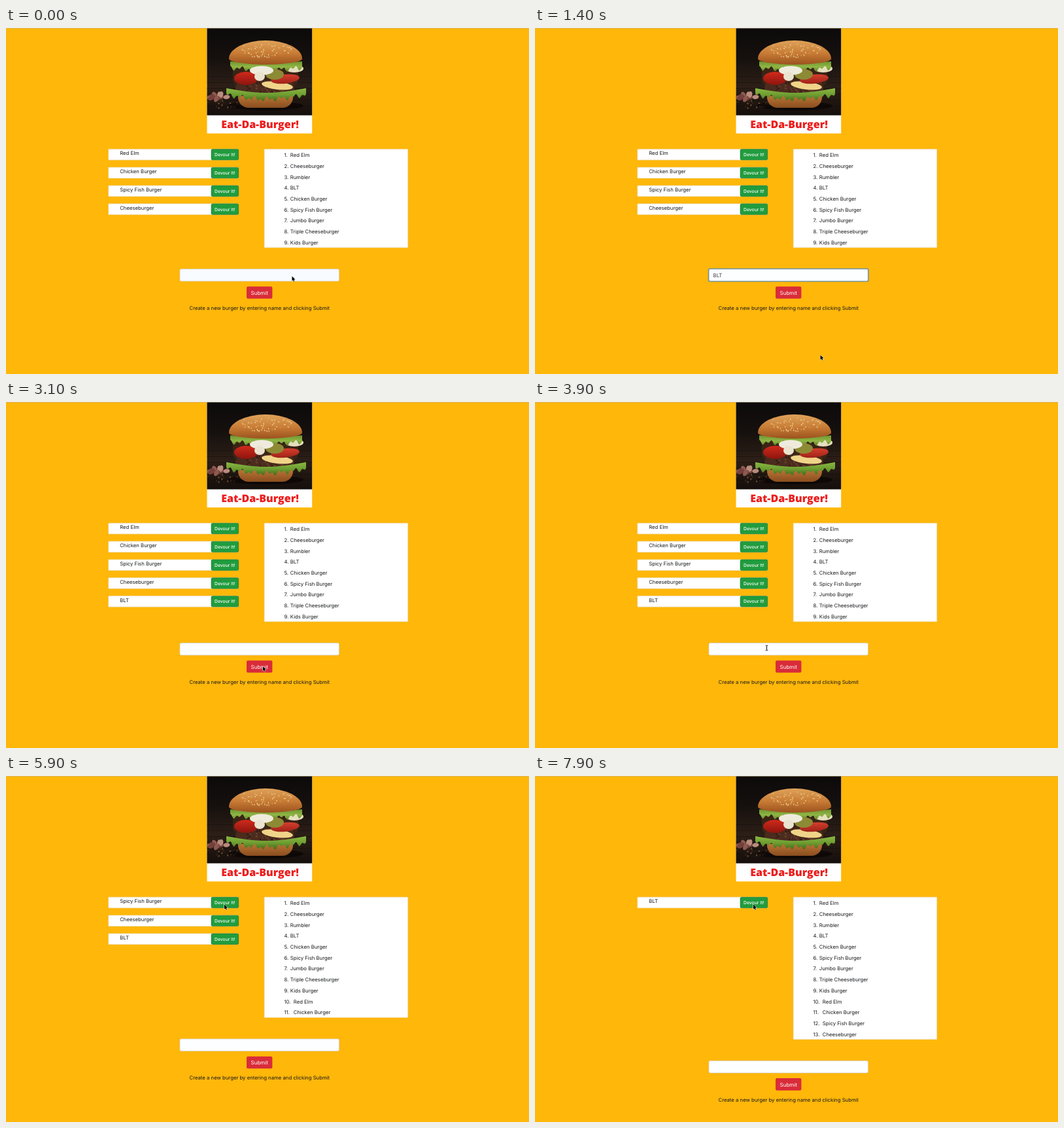
These frames come from a looping animation (800 by 529 pixels, 8 s). An HTML page with a canvas:

```html
<!DOCTYPE html>
<html lang="en">
<head>
<meta charset="utf-8">
<title>Eat-Da-Burger!</title>
<style>
  html, body { margin: 0; width: 100%; height: 100%; overflow: hidden; background: #ffb70a; }
  canvas { display: block; width: 800px; height: 529px; }
</style>
</head>
<body>
<canvas id="stage"></canvas>
<script>
const W = 800, H = 529, LOOP = 8000;
const canvas = document.getElementById('stage');
const dpr = window.devicePixelRatio || 1;
canvas.width = Math.round(W * dpr);
canvas.height = Math.round(H * dpr);
const stage = canvas.getContext('2d');
let ctx = stage;

const SANS = 'Inter, Roboto, sans-serif';
const INK = '#17191c', EDGE = '#e4dcc8';
const TOP = 185, ROW_STEP = 27.85, LIST_STEP = 16.73, HINT_STEP = 20.1;
const menu = ['Red Elm', 'Chicken Burger', 'Spicy Fish Burger', 'Cheeseburger'];
const eaten = ['Red Elm', 'Cheeseburger', 'Rumbler', 'BLT', 'Chicken Burger',
  'Spicy Fish Burger', 'Jumbo Burger', 'Triple Cheeseburger', 'Kids Burger'];
const hints = ['Red Elm', 'Cheeseburger', 'Chicken Burger', 'Spicy Fish Burger', 'Rumbler', 'BLT'];

const FOCUS = 400, PICK = 1400, SUBMIT = 3000, DEVOUR = 4800, BITE = 900;

const home = [437.5, 379.5];
const moves = [
  { from: 850, to: 1250, at: [436.5, 500] },    // last hint
  { from: 1400, to: 1900, at: [438.3, 394] },
  { from: 2500, to: 2800, at: [393, 404] },     // submit
  { from: 3200, to: 3800, at: [354.5, 376] },   // field
  { from: 3900, to: 4450, at: [334, 196.5] }    // first row's button
];

const lerp = (a, b, p) => a + (b - a) * p;

function ease(t, from, to) {
  const p = Math.min(1, Math.max(0, (t - from) / (to - from)));
  return p * p * (3 - 2 * p);
}

function pointerAt(t) {
  return moves.reduce((pos, m) => {
    const e = ease(t, m.from, m.to);
    return pos.map((v, i) => lerp(v, m.at[i], e));
  }, home);
}

function box(x, y, w, h, fill, r = 0, stroke, line = 0.6) {
  ctx.beginPath();
  ctx.roundRect(x, y, w, h, r);
  if (fill) { ctx.fillStyle = fill; ctx.fill(); }
  if (stroke) { ctx.strokeStyle = stroke; ctx.lineWidth = line; ctx.stroke(); }
}

function label(str, x, y, { size = 7.75, color = INK, weight = 400, align = 'left', family = SANS } = {}) {
  ctx.font = `${weight} ${size}px ${family}`;
  ctx.textAlign = align;
  ctx.fillStyle = color;
  ctx.fillText(str, x, y);
}

function oval(x, y, rx, ry, fill, turn = 0) {
  ctx.beginPath();
  ctx.ellipse(x, y, rx, ry, turn, 0, Math.PI * 2);
  ctx.fillStyle = fill;
  ctx.fill();
}

function fade(y0, y1, ...colors) {
  const g = ctx.createLinearGradient(0, y0, 0, y1);
  colors.forEach((c, i) => g.addColorStop(i / (colors.length - 1), c));
  return g;
}

// Lettuce edge: a sagging band with a rippled underside
function frill(x0, x1, y, depth, sag, ...colors) {
  const curve = x => y + sag * Math.sin((x - x0) / (x1 - x0) * Math.PI);
  ctx.beginPath();
  for (let x = x0; x <= x1; x++) ctx.lineTo(x, curve(x));
  for (let x = x1; x >= x0; x--) {
    ctx.lineTo(x, curve(x) + depth * (0.7 + 0.3 * Math.sin(x * 0.5) * Math.cos(x * 0.19)));
  }
  ctx.fillStyle = fade(y, y + sag + depth, ...colors);
  ctx.fill();
}

function random(seed) {
  return () => (seed = (seed * 16807) % 2147483647) / 2147483647;
}

// Small ovals spread evenly over a larger one
function sprinkle(count, x, y, rx, ry, size, colors, rnd) {
  for (let i = 0; i < count; i++) {
    const a = rnd() * Math.PI * 2, r = Math.sqrt(rnd());
    oval(x + Math.cos(a) * r * rx, y + Math.sin(a) * r * ry, size, size * 0.65, colors[i % colors.length], a);
  }
}

function drawBurger(cx, rnd) {
  oval(cx, 119, 58, 7, 'rgba(5,3,2,0.6)');
  box(cx - 42, 98, 84, 24, fade(100, 122, '#c27d3a', '#8a4d1e'), [4, 4, 16, 16]);
  box(cx - 50, 58, 100, 30, '#3a2415', 8);
  box(cx - 46, 80, 90, 24, '#4a2b1d', 12);
  sprinkle(50, cx, 92, 38, 9, 1.8, ['#6c412b', '#2c1a13', '#5a3323'], rnd);
  frill(cx - 60, cx + 62, 92, 14, 7, '#8ab843', '#6d9c30', '#3d641a');

  oval(cx + 18, 88, 24, 6, '#f0d489', 0.12);
  oval(cx - 30, 77, 18, 10, fade(67, 87, '#d02a1c', '#8d150e'));
  oval(cx + 30, 78, 22, 7, fade(70, 86, '#d8402e', '#9c2117'), -0.1);
  oval(cx + 44, 62, 14, 6, '#e6dfbf');
  frill(cx - 54, cx + 56, 51, 14, 3, '#6f9530', '#8fb645', '#54791f');
  oval(cx + 14, 71, 14, 8, '#8d8a35');
  oval(cx - 6, 65, 18, 7, '#efebdc');
  oval(cx - 9, 74, 8, 7, '#e9e3d0');

  // Upper bun: a dome flattened at the base
  ctx.beginPath();
  ctx.ellipse(cx, 47, 56, 28, 0, Math.PI, 0);
  ctx.ellipse(cx, 47, 56, 9, 0, 0, Math.PI);
  ctx.fillStyle = fade(19, 57, '#dfa25a', '#c97d36', '#99501d');
  ctx.fill();
  sprinkle(75, cx, 34, 43, 11, 1.2, ['#f0ca8b', '#e3b878', '#cf9850'], rnd);
}

function drawPhoto() {
  const rnd = random(77);
  ctx.save();
  ctx.beginPath();
  ctx.rect(307.5, 0.5, 160.7, 133);
  ctx.clip();
  box(307, 0, 162, 134, fade(0, 134, '#0c0a0a', '#15100e', '#2c1f17', '#140e0b'));
  for (let y = 74; y < 120; y += 9) box(307, y, 162, 0.8, 'rgba(14,9,7,0.5)');
  sprinkle(30, 334, 115, 25, 8, 1.5, ['#6d4c34', '#392519'], rnd);
  sprinkle(9, 326, 106, 14, 5, 5, ['#8d5a50', '#b98c7e', '#74403c'], rnd);
  drawBurger(397, rnd);
  ctx.restore();
}

function drawHeader() {
  box(0, 0, W, 1, '#dcb357');
  box(307.5, 0.5, 160.7, 160.7, '#fff');
  drawPhoto();
  label('Eat-Da-Burger!', 388.5, 153.3,
    { size: 16, color: '#ee1c1c', weight: 800, align: 'center', family: '"Open Sans", "Noto Sans", sans-serif' });
}

// The header never changes, so it is painted once
const header = document.createElement('canvas');
header.width = canvas.width;
header.height = Math.round(165 * dpr);
ctx = header.getContext('2d');
ctx.textRendering = 'geometricPrecision';
ctx.scale(dpr, dpr);
drawHeader();
ctx = stage;

function drawMenu(items) {
  items.forEach((name, i) => {
    const y = TOP + i * ROW_STEP;
    box(156.8, y + 0.2, 198, 16.6, '#fff', 0.5, EDGE);
    label(name, 174.2, y + 9.2);
    box(314, y + 0.3, 41.7, 16.4, '#219c3e', 2, '#17752d');
    label('Devour It!', 334.8, y + 11, { size: 6.8, color: '#fff', weight: 500, align: 'center' });
  });
}

function drawEaten(items) {
  box(395.2, TOP + 0.2, 219.5, items.length * LIST_STEP, '#fff', 0.5, EDGE);
  items.forEach((name, i) => {
    const y = TOP + 12.1 + i * LIST_STEP;
    label(`${i + 1}.`, 425.4, y);
    label(name, i < 9 ? 434.8 : 439.8, y);
  });
}

function drawHints() {
  box(265.7, 388, 244, 129.5, '#fff', [0, 0, 3, 3], '#b3a27a');
  hints.forEach((name, i) => label(name, 272.6, 405.2 + i * HINT_STEP, { size: 7.2, weight: 500 }));
}

function drawForm(t, shift) {
  const focused = t >= FOCUS && t < SUBMIT;
  const open = focused && t < PICK;
  const chosen = focused && !open;
  const y = 368.6 + shift;
  if (chosen) box(264.6, y - 1.3, 246.2, 21, '#8f9670', 3);
  box(266, y, 243.4, 18.4, t < FOCUS ? '#f8fbff' : '#fdfeff', 2, focused ? '#5c90b5' : '#ced4da', open ? 1.2 : 0.7);
  if (chosen) label('BLT', 272.6, y + 12.2, { color: '#33383d' });

  box(368, 395.2 + shift, 39.4, 18.6, '#d92c3a', 2);
  label('Submit', 387.7, 407.6 + shift, { size: 8, color: '#fff', align: 'center' });
  label('Create a new burger by entering name and clicking Submit', 387.8, 430.8 + shift, { align: 'center' });
  if (open) drawHints();
}

function drawBeam() {
  ctx.beginPath();
  for (const side of [-1, 1]) {
    ctx.moveTo(side * 1.8, -4);
    ctx.quadraticCurveTo(0, -4, 0, -2.8);
    ctx.lineTo(0, 2.8);
    ctx.quadraticCurveTo(0, 4, side * 1.8, 4);
  }
  ctx.strokeStyle = '#111';
  ctx.lineWidth = 0.9;
  ctx.stroke();
}

function drawArrow() {
  const shape = new Path2D('M0 0V7.2L1.6 5.7 2.7 8.3 3.9 7.8 2.8 5.2 5 5.1Z');
  ctx.strokeStyle = '#fff';
  ctx.lineWidth = 1;
  ctx.lineJoin = 'round';
  ctx.stroke(shape);
  ctx.fillStyle = '#000';
  ctx.fill(shape);
}

function drawPointer(t) {
  const [x, y] = pointerAt(t);
  const overField = t > SUBMIT && y > 368 && y < 387;
  ctx.save();
  ctx.translate(x, y);
  if (overField) drawBeam(); else drawArrow();
  ctx.restore();
}

function draw(t) {
  ctx.setTransform(dpr, 0, 0, dpr, 0, 0);
  ctx.textRendering = 'geometricPrecision';
  box(0, 0, W, H, '#ffb70a');
  ctx.drawImage(header, 0, 0, W, header.height / dpr);

  const done = Math.max(0, Math.floor((t - DEVOUR) / BITE) + 1);
  const all = t >= SUBMIT ? [...menu, 'BLT'] : menu;
  drawMenu(all.slice(done));
  drawEaten([...eaten, ...all.slice(0, done)]);
  drawForm(t, done * LIST_STEP);
  drawPointer(t);
}

const start = performance.now();
function tick() {
  const t = (performance.now() - start) % LOOP;
  draw(Math.floor(t / 100) * 100);
  requestAnimationFrame(tick);
}
tick();
</script>
</body>
</html>
```
